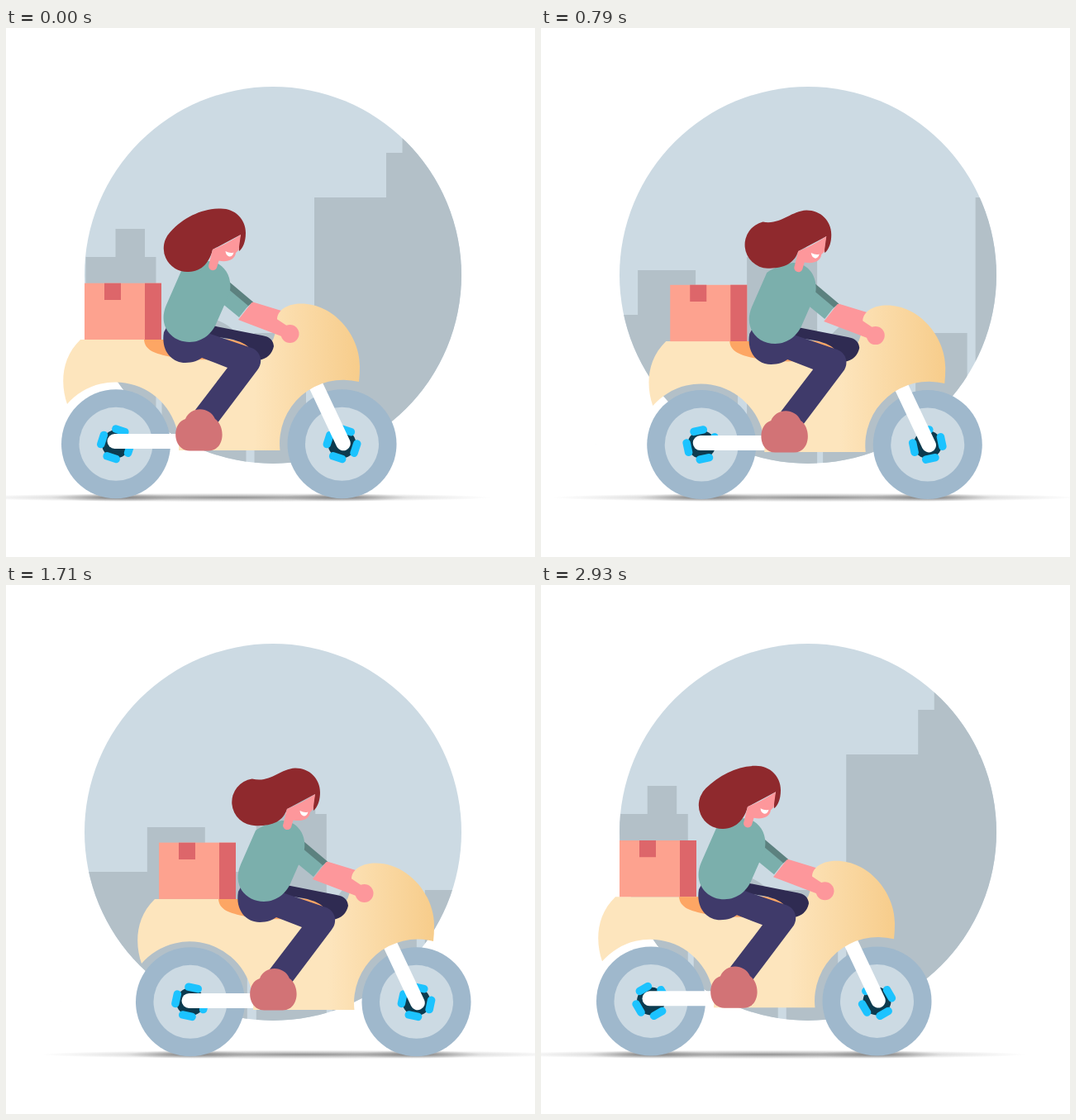
Write an HTML page that moves like this. It is 640 by 640 pixels and loops after 3000 ms.

```html
<!DOCTYPE html>
<html lang="en">
<head>
<meta charset="utf-8">
<title>Scooter delivery</title>
<style>
html, body { margin: 0; width: 100%; height: 100%; overflow: hidden; background: #fff; }
svg { display: block; width: 100vw; height: 100vh; }
</style>
</head>
<body>
<svg viewBox="0 0 640 640">
  <defs>
    <clipPath id="porthole"><circle cx="323" cy="299" r="228"/></clipPath>
    <linearGradient id="paint" gradientUnits="userSpaceOnUse" x1="300" y1="0" x2="425" y2="0">
      <stop stop-color="#fde5bd"/><stop offset="1" stop-color="#f7cd8c"/>
    </linearGradient>
    <radialGradient id="shade">
      <stop stop-color="#555" stop-opacity=".65"/>
      <stop offset=".5" stop-color="#666" stop-opacity=".32"/>
      <stop offset="1" stop-color="#888" stop-opacity="0"/>
    </radialGradient>

    <!-- One period of skyline; x = 0 is the left edge of the tallest tower -->
    <g id="city">
      <path d="M0 560V205H87V151H106.500V109H137.500V151H160.500V205H197.500V560Z"/>
      <path d="M208 560V309H222V227H250.500V309H259V271H280V309H310V560Z"/>
      <path d="M329.500 560V347H403.500V293H473.500V347H524.500V560Z"/>
      <path d="M535.500 560V277H571.500V243H607V277H620.500V560Z"/>
      <path d="M627.500 560V402A51 51 0 0 1 729.500 402V560Z"/>
      <path d="M739.500 560V369H802V560Z"/>
    </g>

    <g id="pads" fill="#1cc3ff">
      <rect id="pad" x="-10.500" y="-22" width="21" height="9.500" rx="4.500"/>
      <use href="#pad" transform="rotate(90)"/>
      <use href="#pad" transform="rotate(180)"/>
      <use href="#pad" transform="rotate(270)"/>
    </g>
    <g id="wheel">
      <circle r="66" fill="#9fb8cc"/>
      <circle r="44.500" fill="#ccdae3"/>
      <g class="hub"><circle r="17" fill="#0d3b4f"/><use href="#pads"/></g>
    </g>
  </defs>

  <circle cx="323" cy="299" r="228" fill="#ccdae3"/>
  <g clip-path="url(#porthole)" fill="#b3c0c8">
    <g id="skyline">
      <use href="#city" x="-812"/><use href="#city"/><use href="#city" x="812"/>
    </g>
  </g>

  <g id="bike">
    <g fill="url(#shade)">
      <ellipse cx="270" cy="568" rx="318" ry="5.500"/>
      <ellipse cx="133" cy="568" rx="78" ry="5"/>
      <ellipse cx="407" cy="568" rx="78" ry="5"/>
    </g>
    <g id="wheels">
      <use href="#wheel" x="133" y="503.300"/>
      <use href="#wheel" x="406.500" y="503.300"/>
    </g>

    <g id="frame">
      <path d="M131.500 500H212M408 502" stroke="#fff" stroke-width="18" stroke-linecap="round"/>
      <path d="M370 422L408 502.500" stroke="#fff" stroke-width="17.500" stroke-linecap="round"/>
      <path fill="#fd979b" d="M297 331L333 342V358L296 347Z"/>
      <path fill="url(#paint)" d="M90 377H240L300 394Q327 390 328 352C329 340 342 333.500 357 333.500
        C396 333.500 428 371 428 409Q428 419 427 428A77 77 0 0 0 331.500 511H209
        A77 77 0 0 0 74 455C66 432 66 400 90 377Z"/>

      <g fill="#fda28f">
        <rect x="95" y="308.700" width="93" height="68.300"/>
        <path fill="#dd666a" d="M168 308.700H188V377H168ZM119 308.700H139V329H119Z"/>
      </g>

      <path fill="#fda664" d="M167 377H240C265 374 292 377 298 391C285 402 225 404 200 398C180 394 168 390 167 377Z"/>
      <path fill="#2f2b52" d="M244 359L310 372Q323 374 324 385Q321 399 306 402L297 390Q290 380 270 376L244 372Z"/>
      <path fill="#3f3a6a" d="M191 368C187 391 201 405 217 405C226 405 233 402 237 399L268 411L229 462L255 479
        L304 414C312 404 308 391 297 387L247 370L240 355H198Z"/>
      <path fill="#d27376" d="M222 511.500C201 511 200 478 217 473C223 457.500 246 457 253 473
        C266 482 265 511 245 511.500Z"/>

      <path fill="#5c817f" d="M270 307L299 331.500L291 338L268 319Z"/>
      <path fill="#fd979b" d="M297.500 332L281 353L336 374L341 361Z"/>
      <circle cx="343.500" cy="370" r="11" fill="#fd979b"/>
      <path fill="#7bafac" d="M268 315L293 336L282 350L260 332Z"/>
      <path fill="#7bafac" d="M212 294L194 335C183 360 200 380 222 380C238 380 250 369 255 356L270 322
        C276 300 262 282 244 282C232 284 220 288 212 294Z"/>

      <path id="hair" fill="#8f292d"/>
      <path fill="#fd979b" d="M284 250Q268 261 250 268L245.500 286A5 5 0 0 0 255 290L257.500 281.500
        C267 283.500 277 281 278 272L281.500 268.500Z"/>
      <path fill="#fff" d="M265.500 270Q271 273 275.500 271.500Q274 277 270 276.500Q266 275 265.500 270Z"/>
    </g>
  </g>
</svg>

<script>
const LOOP = 3000;
const CITY_WIDTH = 812;
const $ = id => document.getElementById(id);
const move = (id, x, y) => $(id).setAttribute('transform', `translate(${x} ${y})`);
const smooth = u => u * u * (3 - 2 * u);
const mix = (a, b, u) => a + (b - a) * u;
const hub = document.querySelector('.hub');

// The picture holds for 1/14 s at a time, showing the next tick of a 25 fps clock.
function tickAt(ms) {
  const hold = Math.floor((Math.floor(ms / 10) * 10 + 5) * 7 / 500);
  return Math.ceil(hold * 12.5 / 7 - 1e-9);
}

// sag: 0 = hair streaming back, 1 = hair hanging low
function hairPath(sag) {
  const at = (x0, y0, x1, y1) => `${mix(x0, x1, sag)} ${mix(y0, y1, sag)}`;
  return `M260 218.500C${at(240, 220, 238, 218)} ${at(231, 237, 215, 229)} ${at(208, 231, 199, 246.5)}`
    + `A28.500 28.500 0 0 0 ${at(212, 288, 221, 295)}`
    + `C${at(228, 288, 238, 295)} ${at(244, 286, 247, 281)} 250 268`
    + 'L284 250Q281 260 282 270C287 266 290 258 290 248C290 231 277 218.500 260 218.500Z';
}

function draw(ms) {
  const n = tickAt(ms % LOOP);
  const dx = 101 * (n < 35 ? smooth(n / 35) : 1 - smooth((n - 35) / 39));
  const bob = 4 * Math.abs(Math.sin(Math.PI * n / 25)) ** 1.2;
  const city = (((373 - 32.97 * n) % CITY_WIDTH) + CITY_WIDTH) % CITY_WIDTH;

  move('skyline', city, 0);
  move('bike', dx, 0);
  move('frame', 0, bob);
  move('wheels', 0, bob * 0.35);
  hub.setAttribute('transform', `rotate(${48 * n + 18})`);
  $('hair').setAttribute('d', hairPath((1 + Math.cos(2 * Math.PI * n / 12.5)) / 2));
}

function loop() {
  draw(performance.now());
  requestAnimationFrame(loop);
}
loop();
</script>
</body>
</html>
```
